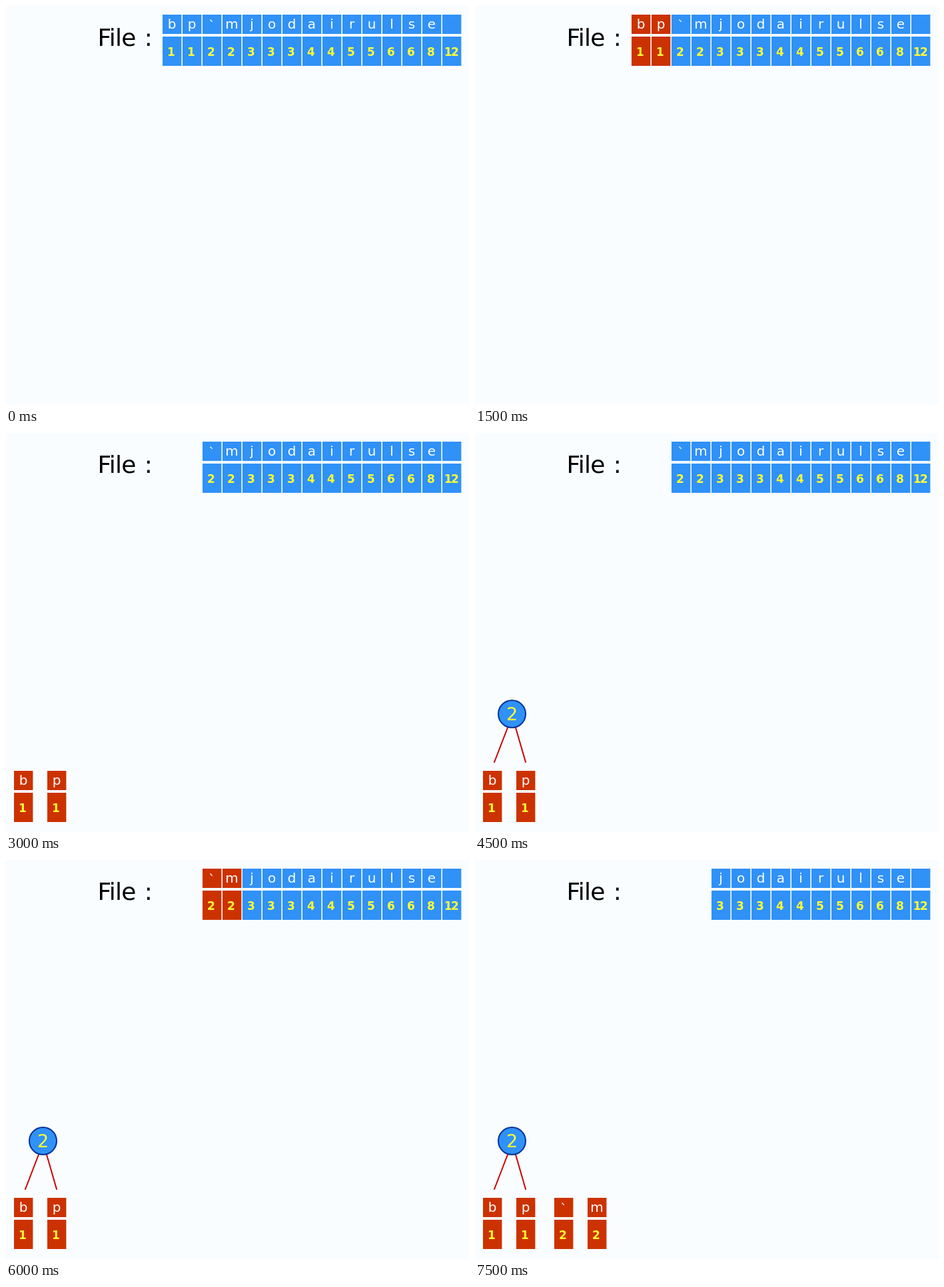
Write an HTML page that moves like this. It is 695 px wide and 600 px high and loops after 8000 ms.

```html
<!DOCTYPE html>
<html lang="en">
<head>
<meta charset="utf-8">
<title>Building a Huffman tree</title>
<style>
  html, body { margin: 0; width: 100%; height: 100%; overflow: hidden; background: #f9fdff; }
  svg { display: block; font-family: "DejaVu Sans", sans-serif; }
  .heading { font-size: 36px; letter-spacing: -.8px; }
  .tile { fill: #3091f7; }
  .letter { font-size: 20px; fill: #fff; text-anchor: middle; }
  .count { font-size: 17px; font-weight: bold; fill: #ff3; text-anchor: middle; }
  .wide { letter-spacing: -1.5px; }
  .edges { stroke: #c00; stroke-width: 2; stroke-linecap: round; fill: none; }
  .node { fill: #3091f7; stroke: #039; stroke-width: 2; }
  .sum { font-size: 27px; fill: #ff3; text-anchor: middle; }

  .first  { animation: take-first 8s step-end infinite; }
  .second { animation: take-second 8s step-end infinite; }
  .parent { animation: appear 8s step-end infinite; }

  @keyframes take-first {
    0%     { fill: #3091f7; transform: none; }
    18.75% { fill: #cc3200; transform: none; }
    37.5%, 100% { fill: #cc3200; transform: translate(var(--dx), 495px); }
  }
  @keyframes take-second {
    0%     { fill: #3091f7; transform: none; }
    75%    { fill: #cc3200; transform: none; }
    93.75%, 100% { fill: #cc3200; transform: translate(var(--dx), 495px); }
  }
  @keyframes appear {
    0% { visibility: hidden; }
    56.25%, 100% { visibility: visible; }
  }
</style>
</head>
<body>
<svg width="695" height="600" viewBox="0 0 695 600">
  <text class="heading" x="137.5" y="60">File <tspan x="207.8">:</tspan></text>
  <g id="tiles"></g>
  <g class="parent">
    <path class="edges" d="M49 443L29 495M61 443L76 495"/>
    <circle class="node" cx="55.5" cy="422.5" r="20.5"/>
    <text class="sum" x="55.5" y="432">2</text>
  </g>
</svg>
<script>
  const letters = [..."b p ` m j o d a i r u l s e".split(" "), ""];
  const counts = [1, 1, 2, 2, 3, 3, 3, 4, 4, 5, 5, 6, 6, 8, 12];
  const leafX = [12, 62, 119, 169];

  const tile = (letter, i) => {
    const x = 235 + 30 * i;
    const turn = i < 2 ? "first" : i < 4 ? "second" : "";
    const shift = turn && `style="--dx:${leafX[i] - x}px"`;
    const wide = counts[i] > 9 ? "wide" : "";
    return `<g class="tile ${turn}" ${shift}>
      <rect x="${x}" y="13" width="28.4" height="29"/>
      <rect x="${x}" y="46" width="28.4" height="44"/>
      <text class="letter" x="${x + 14}" y="${letter === "`" ? 36 : 34}">${letter}</text>
      <text class="count ${wide}" x="${x + 13}" y="75">${counts[i]}</text>
    </g>`;
  };

  document.getElementById("tiles").innerHTML = letters.map(tile).join("");
</script>
</body>
</html>
```
